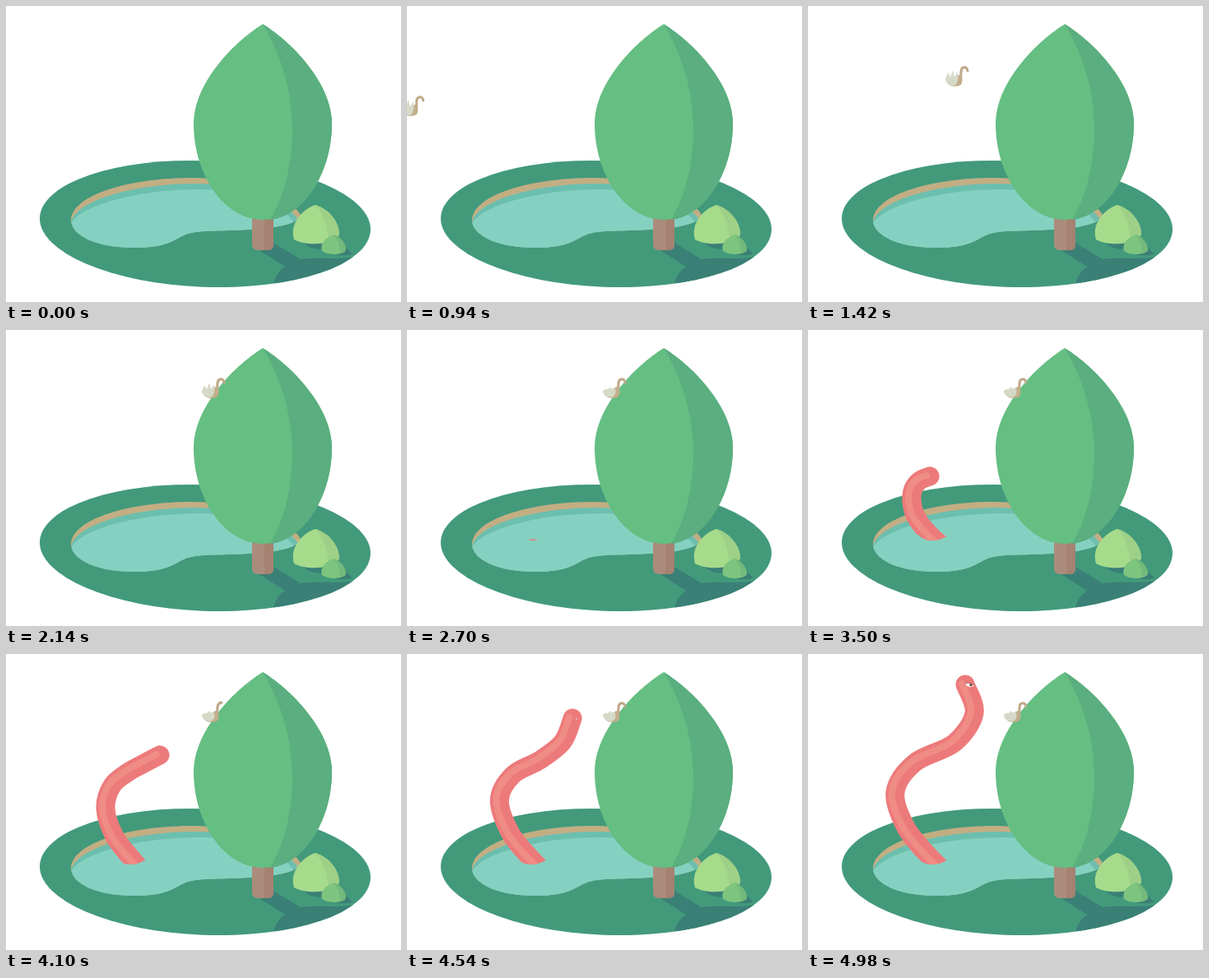
An HTML page for the animation above (5.02 s loop, 480 by 360 pixels).

```html
<!DOCTYPE html>
<html lang="en">
<head>
<meta charset="utf-8">
<title>Pond</title>
<style>
  html, body { margin: 0; height: 100%; overflow: hidden; background: #fff; }
  svg { display: block; width: 480px; height: 360px; }
</style>
</head>
<body>
<svg viewBox="0 0 480 360" fill="none">
  <defs>
    <ellipse id="land" cx="242" cy="265" rx="201.1" ry="76.7" transform="rotate(2.16 242 265)"/>
    <path id="pond" d="M79 261C80 228 155 209 225 209C290 209 345 228 359 256C340 278 250 270 225 276C205 280 205 294 155 294C112 294 80 280 79 261Z"/>
    <clipPath id="onLand"><use href="#land"/></clipPath>
    <clipPath id="inPond"><use href="#pond"/></clipPath>
    <clipPath id="aboveWater"><path d="M0 0H480V235L174 247Q164 256 150 256Q140 256 134 249L0 245Z"/></clipPath>
  </defs>

  <use href="#land" fill="#429a7b"/>
  <use href="#pond" fill="#c3ae83"/>
  <g clip-path="url(#inPond)">
    <path fill="#6cbfae" d="M79 263C85 235 160 216 230 216C285 216 335 234 354 258V300H79Z"/>
    <path fill="#85d1c1" d="M79 264C95 240 165 223 238 223C290 223 335 240 352 266V300H79Z"/>
  </g>
  <g clip-path="url(#onLand)" fill="#3a8076">
    <path d="M306 296L325 288L358 308C378 305 400 309 424 305V345H324C325 332 330 323 339 317Z"/>
    <path d="M362 288C374 291 384 287 404 284L421 302C406 305 392 302 384 296C374 296 366 293 362 288Z"/>
  </g>

  <g id="worm" clip-path="url(#aboveWater)">
    <path id="body" stroke="#ed7a7b" stroke-width="23" stroke-linecap="round" stroke-linejoin="round"/>
    <path id="shine" stroke="#f08c86" stroke-width="8" stroke-linecap="round" transform="translate(-4 -1)"/>
    <g id="eye">
      <path fill="#f6efe6" d="M-6 -1.5Q0 -4 6 0Q2 4 -3 2Z"/>
      <circle cx="1.5" cy="0" r="1.7" fill="#6b4a4a"/>
      <path stroke="#b9605f" d="M-6 -1.5Q0 -4 6 0"/>
    </g>
  </g>

  <path fill="#ab8c7c" d="M299 250H325V290Q325 297 318 297H306Q299 297 299 290Z"/>
  <path fill="#a58271" d="M314 250H325V290Q325 297 318 297H314Z"/>
  <path fill="#65be82" d="M312 22C275 45 228 95 228 143C228 205 265 260 312 260C359 260 396 205 396 143C396 95 349 45 312 22Z"/>
  <path fill="#5aae7f" d="M312 22C349 45 396 95 396 143C396 203 362 256 321 260C338 232 348 192 348 150C348 105 335 60 312 22Z"/>

  <path fill="#a7db8c" d="M376 242C392 247 405 262 405 278C400 290 366 293 350 284C344 265 360 247 376 242Z"/>
  <path fill="#9fd088" d="M376 242C392 247 405 262 405 278Q401 284 392 287C391 268 386 253 376 242Z"/>
  <path fill="#7dc57f" d="M398 278C407 281 413 289 413 297C408 303 392 304 384 298C381 289 389 281 398 278Z"/>
  <path fill="#73b97c" d="M398 278C407 281 413 289 413 297Q411 300 406 301C406 291 403 283 398 278Z"/>

  <g id="bird">
    <path id="neck" stroke="#bfa888" stroke-width="3" stroke-linecap="round"/>
    <path fill="#c3ae8c" d="M-10 0C-8 9 2 11 9 7Q12 2 9 -6L1 -2Z"/>
    <path id="wing" fill="#d5dac8"/>
  </g>
</svg>
<script>
const LOOP = 5020, LAND_AT = 1980;
const el = id => document.getElementById(id);
const clamp = v => Math.min(1, Math.max(0, v));
const mix = (a, b, u) => a + (b - a) * u;

// Worm spine from the water to the head, at each time
const poses = [
  [2700, [168,272, 166,271, 164,270, 162,269, 160,268, 158,267, 155,266, 153,266]],
  [3100, [168,268, 158,260, 152,253, 145,244, 139,233, 135,224, 133,216, 135,209]],
  [3500, [168,266, 152,253, 140,240, 130,225, 126,207, 128,193, 136,183, 148,178]],
  [4100, [168,266, 152,248, 132,222, 121,188, 129,160, 148,144, 168,133, 187,123]],
  [4500, [168,266, 150,248, 126,218, 113,178, 129,148, 160,131, 188,110, 202,82]],
  [4980, [168,266, 148,247, 119,211, 106,168, 130,132, 178,108, 202,72, 191,37]]
];

function spineAt(t) {
  let i = 0;
  while (i < poses.length - 2 && t > poses[i + 1][0]) i++;
  const [[t0, a], [t1, b]] = [poses[i], poses[i + 1]];
  const u = clamp((t - t0) / (t1 - t0));
  const points = [];
  for (let k = 0; k < a.length; k += 2) {
    points.push([mix(a[k], b[k], u), mix(a[k + 1], b[k + 1], u)]);
  }
  return points;
}

// Catmull-Rom curve through the points
function smooth(p) {
  let d = 'M' + p[0];
  for (let i = 0; i < p.length - 1; i++) {
    const before = p[i - 1] || p[i], from = p[i], to = p[i + 1], after = p[i + 2] || to;
    const c1 = from.map((v, k) => v + (to[k] - before[k]) / 6);
    const c2 = to.map((v, k) => v - (after[k] - from[k]) / 6);
    d += `C${c1} ${c2} ${to}`;
  }
  return d;
}

function drawWorm(t) {
  el('worm').style.display = t < 2690 ? 'none' : '';
  const spine = spineAt(t), head = spine[spine.length - 1];
  el('body').setAttribute('d', smooth(spine));
  el('shine').setAttribute('d', smooth(spine));
  const open = clamp((t - 4480) / 220);
  el('eye').setAttribute('transform',
    `translate(${head[0] + 5.5} ${head[1] + .5}) rotate(5) scale(${open})`);
}

function drawBird(t) {
  el('bird').style.display = t < 900 ? 'none' : '';
  const away = (1 - clamp((t - 900) / (LAND_AT - 900))) ** 2;
  el('bird').setAttribute('transform', `translate(${248 - 265 * away} ${74 + 55 * away})`);

  const settled = clamp((t - LAND_AT - 120) / 200);
  const flap = Math.cos((t - 1420) / 240 * 2 * Math.PI);
  const lift = mix(-3 - 5 * flap, -2, settled);
  el('wing').setAttribute('d',
    `M-10 0L-7 ${lift}L-4 -2L-1 ${lift - 3}L1 -2L5 ${lift - 1}Q7 5 1 8Q-8 8 -10 0Z`);

  const stretch = Math.exp(-(((t - 4100) / 140) ** 2));
  const tipX = mix(17, 12, stretch), tipY = mix(-10, -15, stretch);
  el('neck').setAttribute('d', `M8 4C10 -4 7 -13 12 -14Q16 -15 ${tipX} ${tipY}`);
}

function frame(now) {
  const t = now % LOOP;
  drawWorm(t);
  drawBird(t);
  requestAnimationFrame(frame);
}
frame(0);
</script>
</body>
</html>
```
